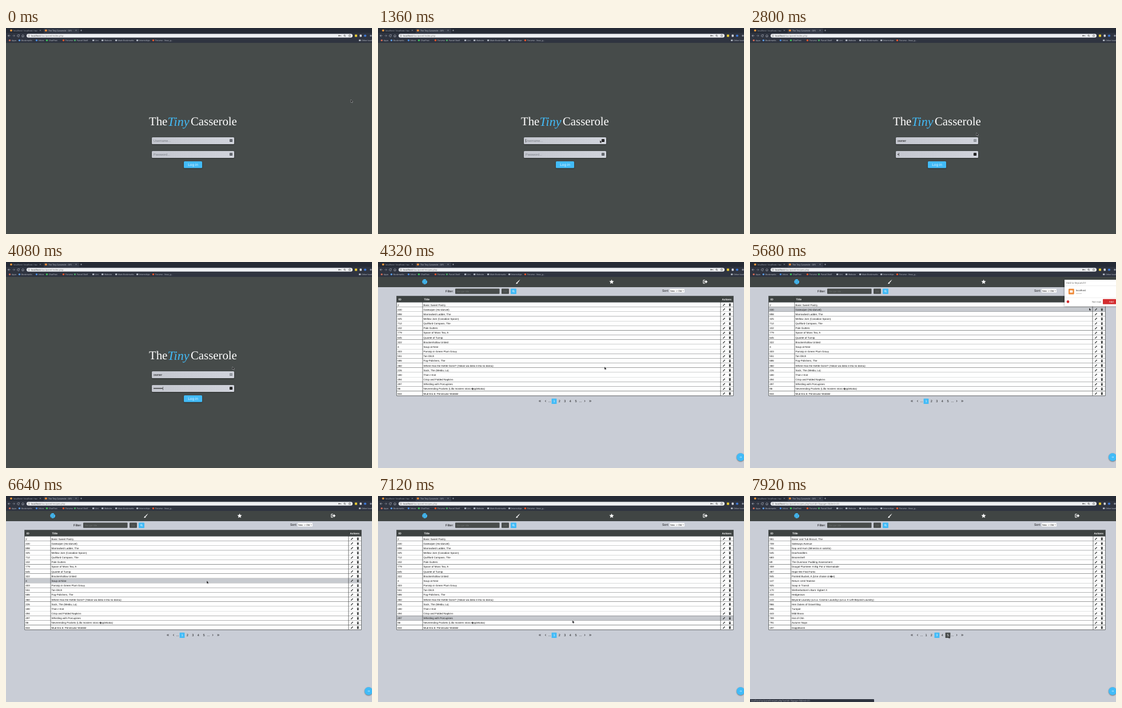
An HTML page with a canvas for the animation above (8 s loop, 640 by 360 pixels).

```html
<!DOCTYPE html>
<html lang="en">
<head>
<meta charset="utf-8">
<title>Recipe manager</title>
<style>
  html, body { margin: 0; width: 100%; height: 100%; overflow: hidden; background: #484c4b; }
  canvas { display: block; width: 100vw; height: 100vh; }
</style>
</head>
<body>
<canvas id="stage"></canvas>
<script>
const canvas = document.getElementById('stage');
const ctx = canvas.getContext('2d');
const dpr = window.devicePixelRatio || 1;
canvas.width = 640 * dpr;
canvas.height = 360 * dpr;

const LOOP = 8000, STEP = 80;
const SANS = '"Liberation Sans", Arial, sans-serif';
const UI = '"Noto Sans", sans-serif';
const SERIF = '"Liberation Serif", serif';
const SLATE = '#464b4a', BLUE = '#42bbf7', PAPER = '#c9cdd6', INK = '#111', LINE = '#3a3d3d';

// Moments at which the scene changes
const FOCUS_USER = 960, FOCUS_PASS = 2400, LOGGED_IN = 4160;
const POPUP_OPEN = 5040, POPUP_CLOSED = 6080, NEXT_PAGE = 7760;
const USER_KEYS = [1840, 2000, 2080, 2160, 2240];
const PASS_KEYS = [2800, 3040, 3280, 3360, 3520, 3600, 3760, 3920];
const USER = 'owner';

const POINTER = [
  [160, 603, 125], [960, 388, 196], [1840, 388, 196], [2000, 396, 183],
  [4880, 396, 183], [5120, 412, 205], [5680, 593, 80], [5920, 604, 69],
  [6080, 604, 69], [6400, 440, 204], [6640, 351, 148], [6720, 351, 149],
  [7120, 340, 217.3], [7440, 327, 241], [7680, 327, 241], [7920, 347, 244]
];

const TABLE = { top: 70.7, rowHeight: 8.158, left: 32.7, right: 621.3 };
TABLE.bottom = TABLE.top + TABLE.rowHeight * 20;

const PAGES = [
  { titleX: 78, rows: `2|Basic Sweet Pastry
430|Gatewiper (Ho-danvel)
898|Marrowbed Ladder, The
325|Mellow Jam (Canadian Spoon)
712|Quillford Compass, The
102|Pale Gutters
779|Spoon of Moss Tea, A
645|Quartet of Turnip
322|Brackenhollow Untied
4|Soup at Nine
403|Parsnip in Green Plum Gravy
551|Tan Ditch
686|Fog-Polishers, The
360|Where Has the Kettle Gone? (Yakan wa doko e itta no darou)
226|Sock, The (Media, La)
180|Then I Knit
494|Crisp and Folded Napkins
497|Whistling with Porcupines
86|Neverending Pockets (Lilla mosters stora \uFFFDpplekaka)
844|Mud Era 6: Peninsular Wobble` },
  { titleX: 71.5, rows: `981|Baker and Tub Biscuit, The
709|Sideways Avenue
755|Nap and Hum (Minestra in salotto)
545|Doorhandlers
683|Broomshelf
69|The Dunmoor Pudding Assessment
359|Dougal Plumtree: A Big Pot o' Marmalade
387|Hope We Find Forks
945|Painted Bucket, A (Une chaise cir\uFFFDe)
147|Return Until Teatime
925|Soap in Transit
170|Wetherbottom's Barn: Egbert X
434|Hedgerows
143|Beyond Laundry (a.k.a. Cosmic Laundry) (a.k.a. It Left Beyond Laundry)
966|Hen Dukes of Gravel Bay
896|Turnpot
443|Mild Brass
789|Hat of Olm
791|Autumn Naps
197|Dapplewick` }
].map(p => ({ ...p, rows: p.rows.split('\n').map(r => r.split('|')) }));

function box(x, y, w, h, fill, radius = 0) {
  ctx.fillStyle = fill;
  ctx.beginPath();
  ctx.roundRect(x, y, w, h, radius);
  ctx.fill();
}
function dot(x, y, r, fill) {
  ctx.fillStyle = fill;
  ctx.beginPath();
  ctx.arc(x, y, r, 0, 7);
  ctx.fill();
}
function text(str, x, y, size, fill, family = SANS, style = '', align = 'left') {
  ctx.font = `${style} ${size}px ${family}`;
  ctx.fillStyle = fill;
  ctx.textAlign = align;
  ctx.fillText(str, x, y);
}
function path(d, x, y, { fill, stroke, width = 1 }) {
  ctx.save();
  ctx.translate(x, y);
  const shape = new Path2D(d);
  if (fill) { ctx.fillStyle = fill; ctx.fill(shape); }
  if (stroke) { ctx.strokeStyle = stroke; ctx.lineWidth = width; ctx.stroke(shape); }
  ctx.restore();
}
function shadowed(blur, draw) {
  ctx.save();
  ctx.shadowColor = 'rgba(0,0,0,.5)';
  ctx.shadowBlur = blur * dpr;
  ctx.shadowOffsetY = dpr * .7;
  draw();
  ctx.restore();
}
function star(outer, inner) {
  return 'M' + Array.from({ length: 10 }, (_, i) => {
    const r = i % 2 ? inner : outer, a = i * Math.PI / 5;
    return `${r * Math.sin(a)} ${-r * Math.cos(a)}`;
  }).join('L') + 'Z';
}
const typed = (keys, t) => keys.filter(k => t >= k).length;

function pointerAt(t) {
  const next = POINTER.findIndex(p => p[0] > t);
  if (next === 0) return POINTER[0].slice(1);
  if (next < 0) return POINTER.at(-1).slice(1);
  const [t0, x0, y0] = POINTER[next - 1], [t1, x1, y1] = POINTER[next];
  const u = (t - t0) / (t1 - t0), e = u * u * (3 - 2 * u);
  return [x0 + (x1 - x0) * e, y0 + (y1 - y0) * e];
}

function drawBrowser(t) {
  const light = '#c3c8d2';
  box(0, 0, 640, 9, '#252a35');
  box(0, 8.5, 640, 17.5, '#2f3440');
  box(66, 0.5, 62, 8.5, '#343a47', [1.5, 1.5, 0, 0]);
  dot(9, 4.3, 1.9, '#e6963c');
  text('localhost / localhost / tuc', 13, 5.6, 3.6, '#a3a8b2', UI);
  dot(69.8, 4.3, 1.9, '#ee8a34');
  text('The Tiny Casserole - Offi', 74, 5.6, 3.6, light, UI);
  for (const x of [60, 122.5]) path('M-1-1 1 1M1-1-1 1', x, 4.3, { stroke: light, width: .5 });
  path('M-1.5 0H1.5M0-1.5V1.5', 131.5, 4.3, { stroke: light, width: .5 });

  path('M2 0H-2M0-2-2 0 0 2', 5.5, 13.5, { stroke: light, width: .6 });
  path('M-2 0H2M0-2 2 0 0 2', 13.5, 13.5, { stroke: '#8b919d', width: .6 });
  path('M1.6-1A1.9 1.9 0 1 0 1.9 .5M2-2V-.7H.7', 21.5, 13.5, { stroke: light, width: .6 });
  path('M-2 0 0-2 2 0M-1.4-.3V2H1.4V-.3', 29.5, 13.5, { stroke: light, width: .6 });

  box(36, 10.3, 570, 6.5, '#eef0f3', 3.2);
  path('M-1.5 0A1.5 1.5 0 1 0 1.5 0A1.5 1.5 0 1 0-1.5 0M0-.2V.9', 40, 13.5, { stroke: '#555', width: .4 });
  text('localhost', 44, 15, 4, '#333', UI);
  const file = t < LOGGED_IN ? 'index.php'
    : t < NEXT_PAGE ? 'recipes.php' : 'recipes.php?sortid=1&page=3&limit=20';
  text('/tuc/panel/' + file, 44 + ctx.measureText('localhost').width, 15, 4, '#777', UI);
  dot(582.3, 13.5, 1.1, '#444');
  path('M0 0H3.4V1', 582.5, 13.5, { stroke: '#444', width: .7 });
  path('M1.2 0A1.2 1.2 0 1 1-1.2 0A1.2 1.2 0 1 1 1.2 0M.9 .9 2 2', 592, 13.2, { stroke: '#444', width: .6 });
  path(star(2.2, 1), 601, 13.5, { stroke: '#444', width: .5 });
  box(610, 11.5, 4, 4, '#e8ca32');
  box(618.5, 11.5, 3.5, 4, '#d5d8de', 1);
  dot(628, 13.5, 2.1, '#3e78d6');
  dot(638, 13.5, 1.7, '#8a909c');

  const marks = [
    ['Apps', 10, '#d36a55'], ['Bookmarks', 27, '#5b9dea'], ['Inbox', 57, '#4a8de0'],
    ['ChatPost', 75, '#3cc65a'], ['Forumo', 104, '#f2572b'], ['Parcel Shelf', 124, '#48a564'],
    ['Uni', 156], ['Website', 172], ['Main Bookmarks', 196], ['Internships', 233],
    ['Forumo - linux_g...', 261, '#f2572b'], ['Other bookmarks', 622]
  ];
  for (const [name, x, color] of marks) {
    if (color) dot(x - 3.5, 21.6, 1.7, color);
    else box(x - 5, 20.3, 3.4, 2.7, '#aeb4bf', .4);
    text(name, x, 22.9, 3.5, light, UI);
  }
}

function drawField(y, value, hint, state, caretX) {
  shadowed(2, () => {
    const shade = ctx.createLinearGradient(255, 0, 399, 0);
    shade.addColorStop(0, '#c4c7cf');
    shade.addColorStop(1, '#d0d3db');
    box(255, y, 144, 12, shade, 1.5);
  });
  text(value || hint, 258, y + 8, 5.5, value ? INK : '#777b82');
  if (state === 'focus') box(caretX, y + 3, .5, 6, INK);
  const icon = { idle: '#555a60', focus: '#111', left: '#8b9097' }[state];
  box(391, y + 3.3, 5, 4.8, icon, .6);
  for (let i = 0; i < 3; i++) box(392 + i * 1.2, y + 5.4, .7, .7, '#e0e2e8');
}

function drawLogin(t) {
  box(0, 26, 640, 334, SLATE);
  text('The', 250, 170, 20.8, '#fff', SERIF);
  text('Tiny', 282.5, 171, 22, BLUE, SERIF, 'italic');
  text('Casserole', 323, 170, 20.8, '#fff', SERIF);

  const name = USER.slice(0, typed(USER_KEYS, t));
  ctx.font = `5.5px ${SANS}`;
  const nameEnd = 258.2 + ctx.measureText(name).width;
  const userState = t < FOCUS_USER ? 'idle' : t < FOCUS_PASS ? 'focus' : 'left';
  drawField(191, name, 'Username...', userState, nameEnd);

  const count = typed(PASS_KEYS, t);
  drawField(215, count ? ' ' : '', 'Password...', t < FOCUS_PASS ? 'idle' : 'focus', 258.2 + count * 2);
  for (let i = 0; i < count; i++) dot(259 + i * 2, 220.8, .85, INK);

  shadowed(2, () => box(311, 233, 32, 11.7, BLUE, 1.5));
  text('Log in', 327, 241.2, 6.5, '#e2f4ff', SANS, '', 'center');
}

function drawNav() {
  const bar = '#404544';
  box(0, 26, 640, 18, bar);
  dot(81.7, 34.5, 4.4, BLUE);
  dot(85.5, 31, 1.5, bar);
  for (const [x, y] of [[80, 33], [82.5, 36.5], [79.7, 36.7], [83, 33.2]]) dot(x, y, .6, bar);
  path('M3.7-4 0 1.3-1.3 0ZM-1.6 .5-.4 1.7C-.6 3.6-2.4 3.8-4 3.6-2.9 2.9-3.2 .9-1.6 .5Z', 245, 34.5, { fill: '#fff' });
  path(star(4.3, 1.9), 408.5, 34.8, { fill: '#fff' });
  path('M-.5-2.8H-3.5V2.8H-.5', 572.3, 34.5, { stroke: '#fff', width: 1 });
  path('M-1.8-.9H.8V-3L4 0 .8 3V.9H-1.8Z', 572.3, 34.5, { fill: '#fff' });
}

function drawFilter() {
  text('Filter:', 118, 52.8, 5.7, INK);
  box(135, 46.5, 77.5, 9.3, '#484c4b', 1);
  text('Recipe title...', 138, 52.6, 4.3, '#6b706f');
  box(216, 46.5, 13, 9.3, '#484c4b', 1);
  text('Clr', 222.5, 52.6, 4.3, '#6b706f', SANS, '', 'center');
  box(232, 46.5, 10, 9.5, BLUE, 1);
  path('M1.3 0A1.3 1.3 0 1 1-1.3 0A1.3 1.3 0 1 1 1.3 0M1 1 2.2 2.2', 236.6, 50.8, { stroke: '#fff', width: .7 });
  text('Sort:', 497, 51.9, 5.4, INK);
  box(510, 47.3, 26, 6, '#fff', .5);
  text('New -> Old', 511, 51.7, 4, INK);
  path('M-1-.5 0 .6 1-.5', 533.7, 50.2, { stroke: INK, width: .5 });
}

function drawTable({ titleX, rows }, hovered) {
  const { top, rowHeight, left, right, bottom } = TABLE;
  const actionsX = titleX < 75 ? 600 : 599;
  box(left, 59.3, right - left, 11.4, '#3d4241');
  text('ID', 36, 66.6, 4.8, '#fff', SANS, 'bold');
  text('Title', titleX + 2.5, 66.6, 4.8, '#fff', SANS, 'bold');
  text('Actions', 601.5, 66.6, 4.5, '#fff', SANS, 'bold');
  rows.forEach(([id, title], i) => {
    const y = top + i * rowHeight;
    box(left, y, right - left, rowHeight, i === hovered ? '#c7cacf' : '#fff');
    text(id, 34.2, y + 5.8, 4.5, INK);
    text(title, titleX + 1.6, y + 5.8, 4.5, INK);
    path('M1.1-2.1 2.1-1.1-1 1.9-2.2 2.2-1.9 1Z', 605, y + 4.1, { fill: LINE });
    path('M-1.8-2H-.6V-2.5H.6V-2H1.8V-1.4H-1.8ZM-1.5-1H1.5L1.3 2.4H-1.3Z', 615.3, y + 4.1, { fill: LINE });
    box(left, y + rowHeight - .35, right - left, .7, LINE);
  });
  for (const x of [left, titleX, actionsX, right]) box(x - .35, 59.3, .7, bottom - 59.3, LINE);
}

function drawPager(active, hovered) {
  const items = [['«', 283], ['‹', 293], ['...', 300], ['1', 308], ['2', 317.4], ['3', 326.9],
    ['4', 336.4], ['5', 346], ['...', 354], ['›', 361.5], ['»', 371]];
  for (const [label, x] of items) {
    const lit = label === active || label === hovered;
    if (lit) box(x - 4.4, 238.8, 8.8, 9.2, label === active ? BLUE : '#484c4b', .6);
    const size = /[«‹›»]/.test(label) ? 7.5 : 5.5;
    text(label, x, 245.2, size, lit ? '#fff' : INK, SANS, '', 'center');
  }
}

function drawPopup() {
  shadowed(3, () => box(550, 31, 92, 46.5, '#fff'));
  text('Add to KeyLatch?', 553, 38, 4.3, '#666', UI);
  box(550, 41, 90, .4, '#ddd');
  box(557, 46.7, 9.7, 9.7, '#ee8937', 1);
  box(559.3, 49.4, 5, 4.2, '#fff', .4);
  text('localhost', 570, 51, 4.1, '#222', UI);
  text(USER, 570, 56, 3.5, '#aaa', UI);
  box(550, 62, 90, .4, '#e2e2e2');
  dot(556, 69.4, 2.3, '#d32d2f');
  text('Not now', 606, 70.7, 4, '#555', UI, '', 'center');
  box(617, 64.7, 23, 9, '#d32d2f', .6);
  text('Add', 632, 70.8, 4.2, '#fff', UI, '', 'center');
}

function drawRecipes(t, [x, y]) {
  const turned = t >= NEXT_PAGE;
  const overRow = t > 4880 && y > TABLE.top && y < TABLE.bottom;
  const row = overRow ? Math.floor((y - TABLE.top) / TABLE.rowHeight) : -1;
  const pageUnder = t < 7440 ? '' : x < 332 ? '3' : x > 341.5 ? '5' : '4';
  box(0, 26, 640, 334, PAPER);
  drawNav();
  drawFilter();
  drawTable(PAGES[turned ? 1 : 0], row);
  drawPager(turned ? '3' : '1', pageUnder);
  shadowed(2, () => dot(634, 341, 7, BLUE));
  path('M-1.7 0H1.7M.4-1.2 1.7 0 .4 1.2', 634, 341, { stroke: '#e2f4ff', width: .6 });
  if (t >= POPUP_OPEN && t < POPUP_CLOSED) drawPopup();
  if (t >= 7600) {
    box(0, 355, 217, 5, '#2f3440', [0, 1, 0, 0]);
    text(`localhost/tuc/panel/recipes.php?sortid=1&page=${pageUnder}&limit=20`, 1.5, 358.8, 3.7, '#b5bac4', UI);
  }
}

function draw(t) {
  ctx.setTransform(dpr, 0, 0, dpr, 0, 0);
  ctx.textRendering = 'geometricPrecision';
  const pointer = pointerAt(t);
  if (t < LOGGED_IN) drawLogin(t);
  else drawRecipes(t, pointer);
  drawBrowser(t);
  path('M0 0V5.2L1.2 4.1 2 5.8 2.9 5.4 2.1 3.8H3.7Z', ...pointer, { fill: '#111', stroke: '#d8dade', width: .4 });
}

function tick(now) {
  draw(Math.floor(now % LOOP / STEP) * STEP);
  requestAnimationFrame(tick);
}
requestAnimationFrame(tick);
</script>
</body>
</html>
```
